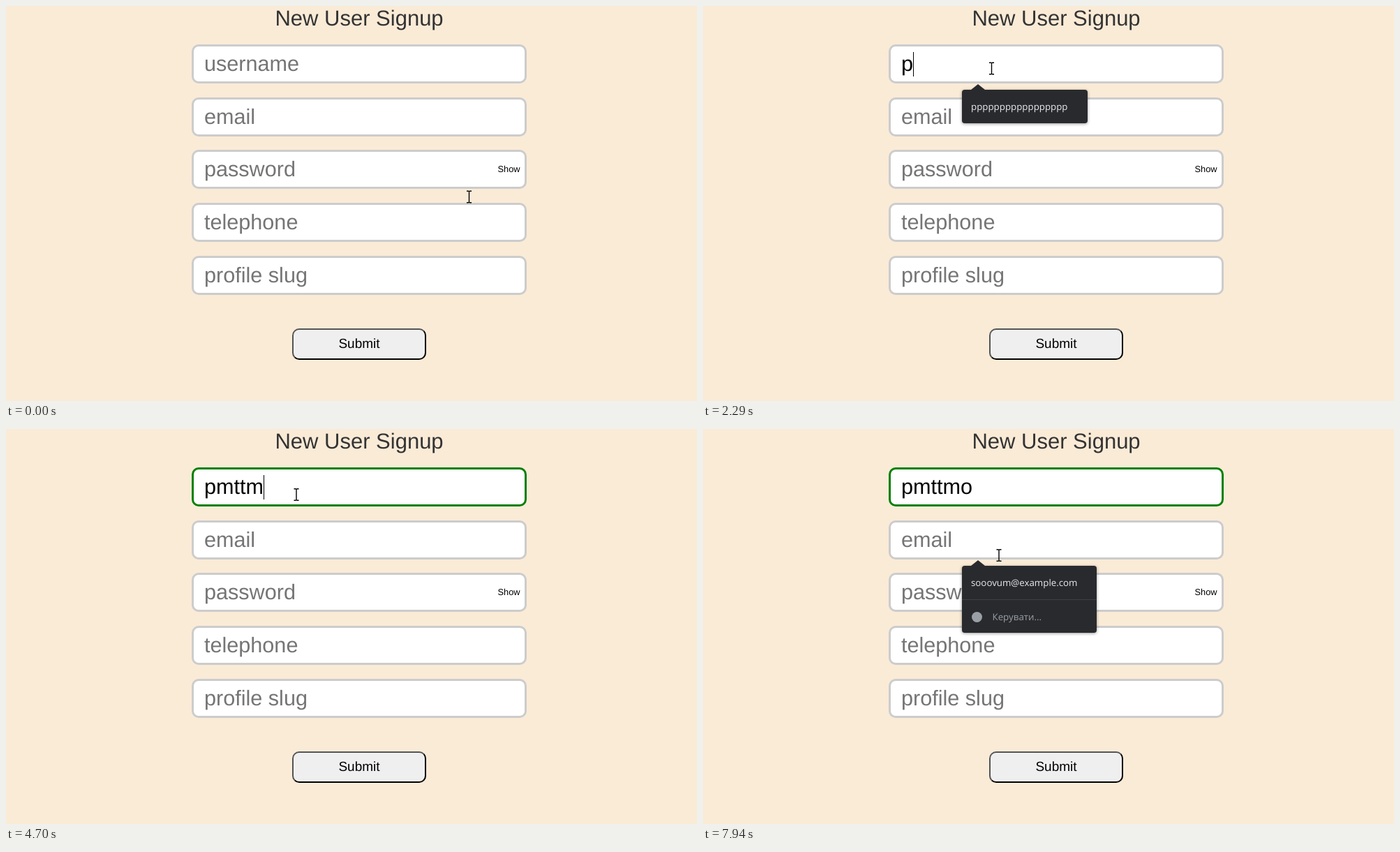
These frames come from a looping animation (990 px wide and 566 px high, 8000 ms). An HTML page:

```html
<!DOCTYPE html>
<html lang="en">
<head>
<meta charset="utf-8">
<title>Signup form</title>
<style>
  html, body { margin: 0; width: 100%; height: 100%; overflow: hidden; background: #faebd7; }
  body { position: relative; font-family: Arial, "Liberation Sans", sans-serif; text-rendering: geometricPrecision; }
  body *  { box-sizing: border-box; white-space: pre; }
  body > *, .field > b, .caret { position: absolute; }
  h1 { margin: 0; left: 266px; width: 480px; top: -2px; font: 31px/40px Arial, "Liberation Sans", sans-serif; color: #333; text-align: center; }
  .field { left: 266px; width: 480px; height: 56px; padding-left: 15px; border: 3px solid #ccc; border-radius: 10px;
           background: #fff; font-size: 30.6px; line-height: 50px; }
  .hint { color: #757575; }
  .caret { width: 1px; height: 35px; top: 7.5px; background: #000; }
  .field > b { right: 6.5px; top: 0; font-size: 12.8px; font-weight: normal; }
  #error { left: 206px; width: 600px; top: 118px; font: bold 13.8px/20px Arial, "Liberation Sans", sans-serif; color: red; text-align: center; }
  #submit { left: 410px; width: 192px; height: 45px; border: 2px outset #000; border-radius: 10px;
            background: #efefef; font-size: 19px; line-height: 41px; text-align: center; }
  #menu { left: 371px; border-radius: 4px; background: #292a2d; color: #e8eaed; box-shadow: 0 1px 4px rgba(0,0,0,.4);
          font: 13.3px/48px "Open Sans", "Noto Sans", sans-serif; }
  #menu::before { content: ""; position: absolute; left: 13px; top: -8px; border: solid transparent; border-width: 0 10px 8px; border-bottom-color: #292a2d; }
  #menu div { height: 48px; padding-left: 13px; }
  #menu .manage { border-top: 1px solid #3f4043; color: #9aa0a6; }
  .manage::before { content: ""; display: inline-block; width: 15px; height: 15px; margin: 0 14.5px 0 1px; border-radius: 50%; background: #9aa0a6; vertical-align: -3px; }
  #pointer { left: 0; top: 0; width: 1px; height: 1px; overflow: visible; }
</style>
</head>
<body>
<h1>New User Signup</h1>
<div id="error">Username must be alphanumeric and contain 5 - 12 characters</div>
<div id="submit">Submit</div>
<div id="menu"></div>
<svg id="pointer">
  <circle id="click" r="12.5" fill="#ff0" fill-opacity=".5"/>
  <path id="beam" d="M-3.5-8.2h2.5l1 .7 1-.7h2.5M0-8V8M-3.5 8.2h2.5l1-.7 1 .7h2.5" fill="none" stroke="#000" stroke-width="1.4"/>
  <path id="arrow" d="M.5.5v17l4-3.8 3 6.8 2.6-1.1-3-6.6h5.4z" fill="#fff" stroke="#000"/>
</svg>
<script>
const LOOP = 8000, SHIFT = 26;
const $ = id => document.getElementById(id);
const show = (el, on) => el.style.display = on ? '' : 'none';
const between = (t, a, b) => t >= a && t < b;
// Latest value in a list of [time, value]
const at = (track, t) => track.filter(k => k[0] <= t).pop()[1];

const value = [[0, ''], [2290, 'p'], [3580, 'pm'], [4010, 'pmt'], [4230, 'pmtt'], [4560, 'pmttm'], [4760, 'pmttmo']];
const caretOn = [[0, 0], [1430, 1], [1960, 0], [2290, 1], [2820, 0], [3350, 1], [5280, 0], [5810, 1],
                 [6880, 0], [7420, 1], [7940, 0]];
const border = [[0, '#ccc'], [2490, 'orange'], [4700, 'green']];

const suggestion = 'p'.repeat(17), mail = 'sooovum@example.com';
const row = text => `<div>${text}</div>`;
const menus = {
  all: { top: 120, width: 192, html: [suggestion, mail, 'dolenk', 'tavimo', 'bruneso'].map(row).join('') },
  one: { top: 120, width: 180, html: row(suggestion) },
  mail: { top: 196, width: 193, html: row(mail) + '<div class="manage">Керувати...</div>' }
};
const menuTrack = [[0, ''], [1490, 'all'], [2290, 'one'], [3580, ''], [6350, 'mail']];

// Pointer moves: start, end, number of steps, target x, y
const moves = [
  [270, 270, 1, 660, 264], [470, 470, 1, 659, 265], [660, 1360, 11, 413.5, 89.5],
  [2820, 2890, 2, 416, 94], [5750, 5870, 3, 493, 209.5], [6150, 6280, 3, 443.5, 162], [7420, 7610, 3, 424, 181]
];
function pointerAt(t) {
  let x = 663.5, y = 273.5;
  for (const [start, end, steps, toX, toY] of moves) {
    if (t < start) break;
    const gap = (end - start) / (steps - 1 || 1) || 1;
    const p = Math.min(1, (Math.floor((t - start) / gap + .01) + 1) / steps);
    const ease = p * p * (3 - 2 * p);
    x += (toX - x) * ease;
    y += (toY - y) * ease;
  }
  return [x, y];
}

const fields = ['username', 'email', 'password', 'telephone', 'profile slug'].map((hint, i) => {
  const el = document.createElement('div');
  el.className = 'field';
  el.innerHTML = `<span></span><i class="caret"></i><span class="hint">${hint}</span>` + (i === 2 ? '<b>Show</b>' : '');
  document.body.insertBefore(el, $('error'));
  const [text, caret, label] = el.children;
  return { el, text, caret, label };
});

let openMenu;
function setMenu(name) {
  if (name === openMenu) return;
  openMenu = name;
  show($('menu'), name);
  if (!name) return;
  const { top, width, html } = menus[name];
  $('menu').innerHTML = html;
  $('menu').style.top = top + 'px';
  $('menu').style.width = width + 'px';
}

function draw(t) {
  const invalid = between(t, 2490, 4700), shift = invalid ? SHIFT : 0;
  const focus = t < 6350 ? 0 : 1, typed = at(value, t);
  fields.forEach((f, i) => {
    f.el.style.top = 55 + i * 75.7 + (i && shift) + 'px';
    show(f.caret, i === focus && at(caretOn, t));
  });
  const user = fields[0];
  user.el.style.borderColor = at(border, t);
  user.text.textContent = typed;
  show(user.label, !typed);
  show($('error'), invalid);
  $('submit').style.top = 462 + shift + 'px';
  setMenu(at(menuTrack, t));

  const [x, y] = pointerAt(t), isArrow = between(t, 270, 660);
  $('pointer').style.transform = `translate(${x}px, ${y}px)`;
  show($('arrow'), isArrow);
  show($('beam'), !isArrow);
  show($('click'), between(t, 1360, 1560) || between(t, 6280, 6420));
}

function tick() {
  draw(performance.now() % LOOP);
  requestAnimationFrame(tick);
}
tick();
</script>
</body>
</html>
```
